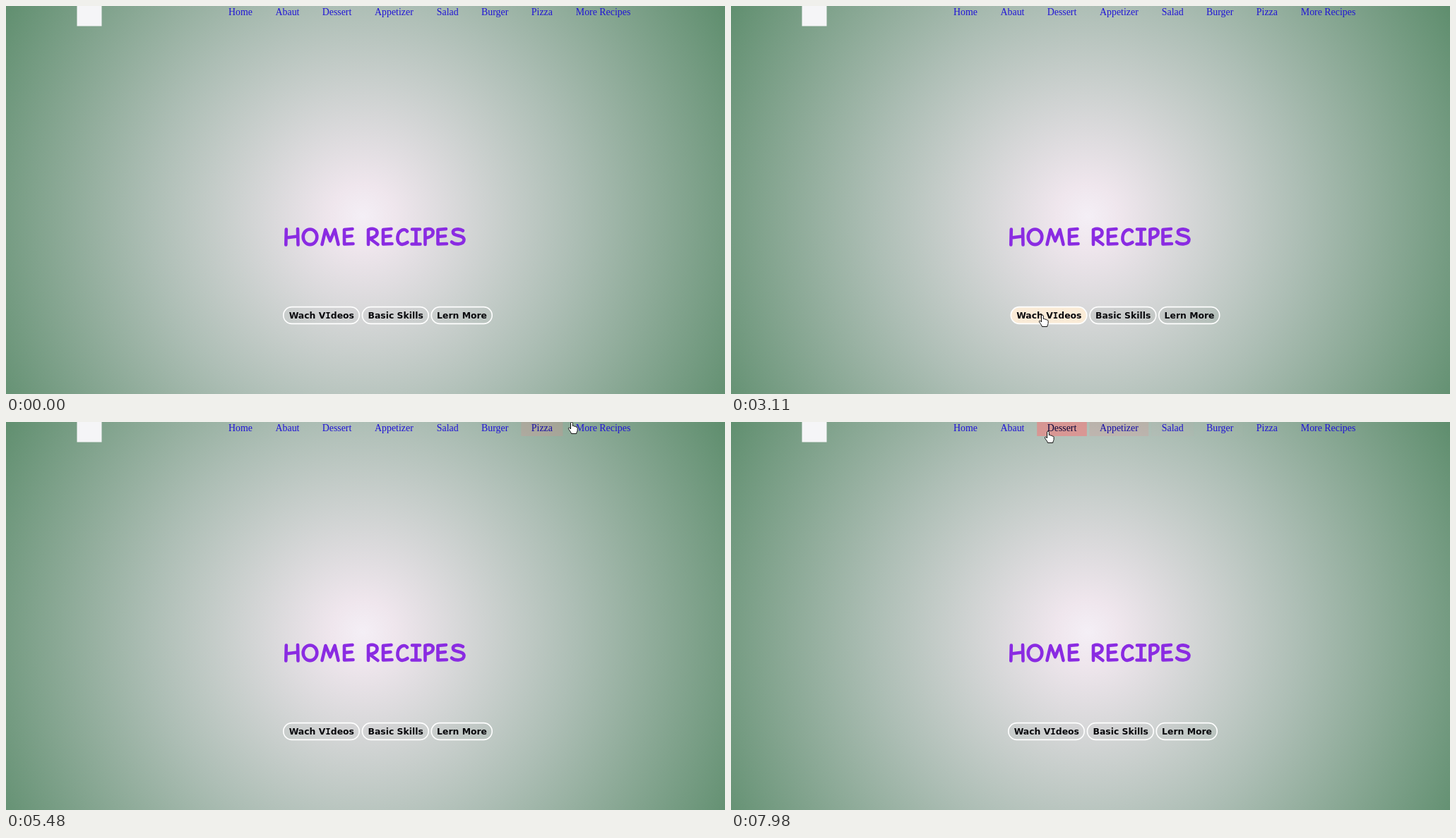
Animation, 1018 px wide and 550 px high, one loop 8 s. Source, as an HTML page:

```html
<!DOCTYPE html>
<html lang="en">
<head>
<meta charset="utf-8">
<title>Home Recipes</title>
<style>
  html, body { margin: 0; width: 100%; height: 100%; overflow: hidden; }
  body {
    position: relative;
    background: radial-gradient(circle 592px at 505px 298px,
      #f4eff6, #efe6ed 45px, #adbeb5 300px, #5f8e6e);
  }
  svg { position: absolute; left: 0; top: 0; display: block; }
  h1 {
    position: absolute; left: 393px; top: 306px; margin: 0;
    font: bold 34px/42px "DejaVu Sans", sans-serif;
    color: transparent; white-space: nowrap; width: 258px; overflow: hidden;
  }
  .nav text { font: 13.9px "Liberation Serif", "Times New Roman", serif; }
  .btn text {
    font: bold 12.4px "DejaVu Sans", Verdana, sans-serif;
    text-anchor: middle; fill: #08080c;
  }
  .btn tspan { font-family: "DejaVu Sans Mono", monospace; }
  .btn rect { stroke: #fff; stroke-width: 1.6; }
  .title {
    fill: none; stroke: #8a2be2; stroke-width: 4.6;
    stroke-linecap: round; stroke-linejoin: round;
  }
  .cursor path { fill: #fff; stroke: #111; stroke-width: 1; stroke-linejoin: round; }
</style>
</head>
<body>
<h1>HOME RECIPES</h1>
<svg id="stage" width="1018" height="550" viewBox="0 0 1018 550">
  <rect x="100.5" y="-7" width="35" height="35.5" fill="#f5f5f7"/>
  <g class="nav" id="nav"></g>
  <!-- brush lettering of the heading -->
  <g class="title" aria-hidden="true">
    <path d="M396.8 316.5L396.3 338.5M413 316L413.5 338.5M397 328.5L412.5 326.5"/>
    <ellipse cx="430.5" cy="327.3" rx="9.8" ry="10.8"/>
    <path d="M447.5 338L452.5 317L459 333L465.5 317L470.5 338"/>
    <path id="e" d="M490.5 316L479 317V337.5L491.5 337M479 327L489.5 326"/>
    <path d="M513 338V317C520 314 526 317 525.5 322C525 327 518 329 513 329.5M515 329.5L526.5 338"/>
    <use href="#e" x="55"/>
    <path d="M568 319.5C565 314.5 556 317 554.5 327C553.5 337 560 341 568.5 335"/>
    <path d="M575 316.5H586M580.5 316.5V337.5M574.5 337.5H586.5"/>
    <path d="M593.5 338V317C602 314 605.5 318 604.5 322.5C603.5 327 597 328.5 594 329"/>
    <use href="#e" x="132.5"/>
    <path d="M647 318.5C642 315 632.5 316 633 321C633.5 327 648 324 648.5 331C648.5 338.5 636 339 631 334.5"/>
  </g>
  <g class="btn" id="buttons"></g>
  <g class="cursor" id="cursor">
    <path id="arrow" d="M.5 0V11.5L3.2 9L5 13.2L6.9 12.4L5.1 8.2H8.6Z"/>
    <path id="hand" d="M-1.5 1.2C-1.5-.2 1.3-.2 1.3 1.2V5.8C1.6 5 3.9 5.2 3.9 6.6C4.5 5.8 6.3 6.2 6.3 7.4C7 6.8 8.1 7.3 8.1 8.5V11.5C8.1 13.4 6.8 14 6.7 16.5H-.6C-.8 14.3-3 12.7-4.5 9.8C-5.3 8.2-3.4 7.5-2.5 8.7L-1.5 10Z"/>
  </g>
</svg>
<script>
const LOOP = 8000, STEP = 67.7, FIRST = 115;
const SHIFT = 3.5, PAD = 14.5, NAV_BOTTOM = 20;
const FADE = 1 - Math.exp(-STEP / 260);   // share of a hover fade done per step
const byId = id => document.getElementById(id);

function add(parent, tag, attrs, content = "") {
  const node = document.createElementNS("http://www.w3.org/2000/svg", tag);
  for (const key in attrs) node.setAttribute(key, attrs[key]);
  node.innerHTML = content;
  return parent.appendChild(node);
}

const links = [
  ["Home", 315], ["Abaut", 381.5], ["Dessert", 447.7], ["Appetizer", 522],
  ["Salad", 609.8], ["Burger", 673], ["Pizza", 743.8], ["More Recipes", 806.8]
].map(([label, x]) => {
  const box = add(byId("nav"), "rect", { x: x - PAD, y: 0, height: NAV_BOTTOM, fill: "#f08080" });
  const text = add(byId("nav"), "text", { x, y: 13 }, label);
  const right = x + text.getComputedTextLength() + PAD;
  box.setAttribute("width", right - x + PAD);
  return { left: x - PAD, right, box, text };
});

const buttons = [
  ["Wach V<tspan>I</tspan>deos", 392, 501],
  ["Basic Skills", 503.7, 599],
  ["Lern More", 601.5, 689]
].map(([label, left, right]) => {
  const group = add(byId("buttons"), "g", {});
  const box = add(group, "rect", {
    x: left + .8, y: 426.6, width: right - left - 1.6, height: 23.8, rx: 11.9
  });
  add(group, "text", { x: (left + right) / 2 + .3, y: 443.3 }, label);
  return { left, right, group, box };
});

// waypoints of the pointer tip: time, x, y
const path = [
  [120, 864, 541], [720, 730, 421], [860, 745, 404], [930, 745, 404],
  [1200, 745, 391], [1400, 745, 391], [1740, 756, 375], [2220, 756, 375],
  [2400, 722, 343], [2970, 437, 414], [3100, 441, 438], [3790, 545, 442],
  [4250, 617, 436], [4670, 650, 430], [5400, 765, 14], [5468, 801, 0],
  [5950, 838, 8], [6130, 838, 8], [6484, 704, 12], [6900, 654, 12],
  [7600, 510, 13], [7770, 452, 13], [7973, 449, 13]
];

function pointerAt(step) {
  const t = FIRST + 5 + step * STEP;
  const i = path.findIndex(p => p[0] >= t);
  const b = path.at(i), a = path[i - 1] || b;
  const u = a === b || i < 0 ? 1 : (t - a[0]) / (b[0] - a[0]);
  const mix = k => Math.round(a[k] + (b[k] - a[k]) * u);
  return { x: mix(1), y: mix(2) };
}

const within = (item, x) => x >= item.left && x <= item.right;

// every hover strength follows from where the pointer has been
function hoverLevel(link, step) {
  let level = 0;
  for (let i = 0; i < step; i++) {
    const p = pointerAt(i);
    const goal = p.y < NAV_BOTTOM && within(link, p.x) ? 1 : 0;
    level += (goal - level) * FADE;
  }
  return level;
}

function draw(step) {
  const { x, y } = pointerAt(Math.max(step, 0));

  for (const link of links) {
    const level = hoverLevel(link, step), rest = 1 - level;
    link.box.setAttribute("opacity", level * .87);
    link.text.setAttribute("fill", `rgb(${32 * rest},${20 * rest},${214 * rest})`);
  }

  const inRow = y >= 426 && y <= 451;
  const hot = inRow ? buttons.findIndex(b => within(b, x)) : -1;
  buttons.forEach((b, i) => {
    const moved = hot >= 0 && i >= hot;
    b.group.setAttribute("transform", `translate(${moved ? SHIFT : 0} 0)`);
    b.box.setAttribute("fill", i === hot ? "#faebd7" : `rgba(0,20,10,${hot >= 0 ? .05 : .02})`);
  });

  const pointing = hot >= 0 || y < NAV_BOTTOM;
  byId("cursor").setAttribute("visibility", step < 0 ? "hidden" : "visible");
  byId("cursor").setAttribute("transform", `translate(${x} ${y})`);
  byId("hand").style.display = pointing ? "" : "none";
  byId("arrow").style.display = pointing ? "none" : "";
}

const start = performance.now();
let shown;
function tick() {
  const time = (performance.now() - start) % LOOP;
  const step = Math.floor((time - FIRST) / STEP);
  if (step !== shown) draw(shown = step);
  requestAnimationFrame(tick);
}
tick();
</script>
</body>
</html>
```
